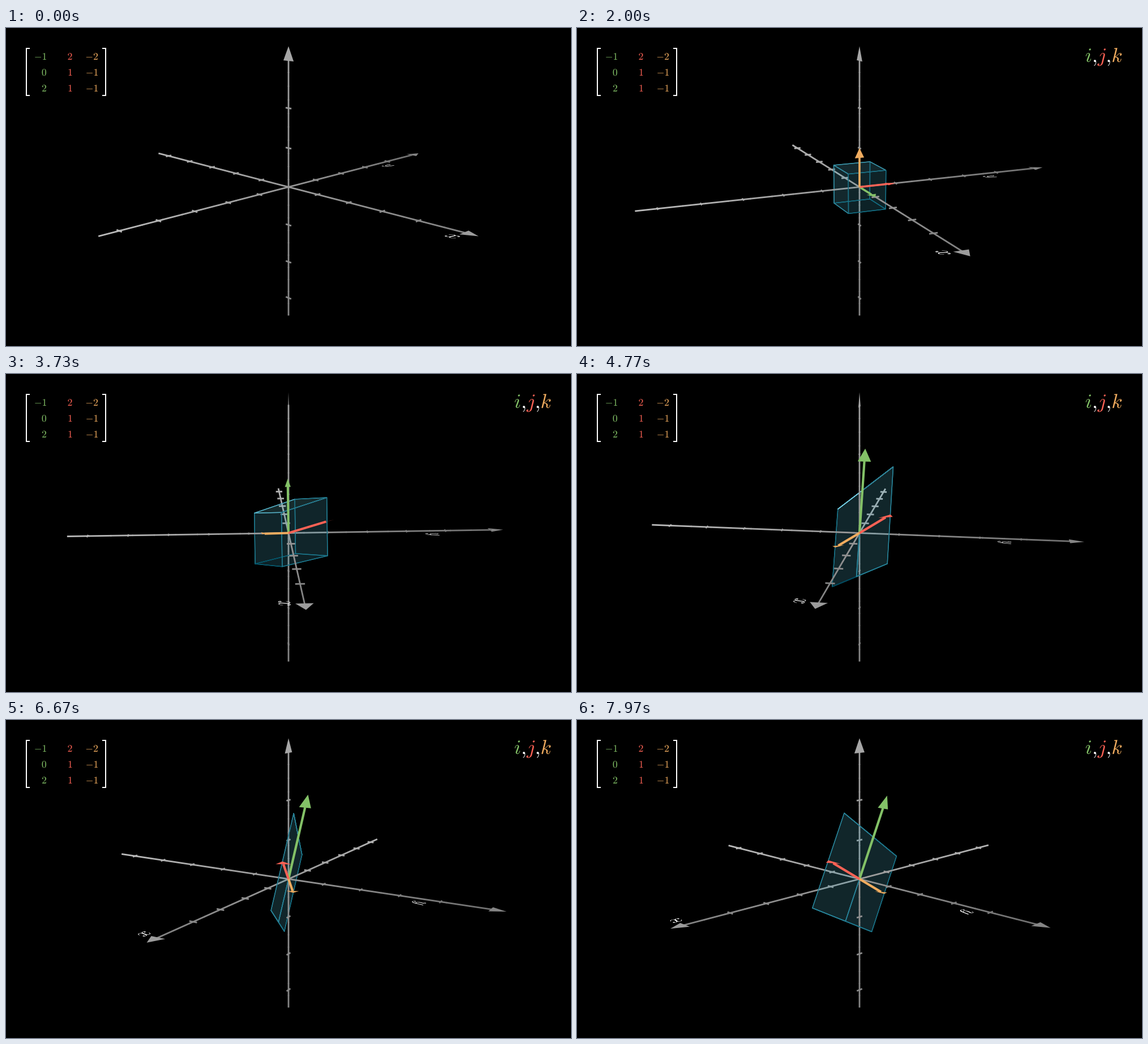
A matplotlib script that plays this animation: 998 by 561 pixels, repeating every 8 s.

```python
import math

import numpy as np
import matplotlib.pyplot as plt
from matplotlib.animation import FuncAnimation
from matplotlib.collections import PolyCollection
from matplotlib.patches import PathPatch, Rectangle
from matplotlib.path import Path
from matplotlib.textpath import TextPath

plt.rcParams["mathtext.fontset"] = "cm"

W, H, DPI = 998, 561, 64
PX = 72 / DPI                      # one pixel in points
UNIT = H / 8                       # pixels per scene unit
CENTER = np.array([499.0, 280.5])
FPS, FRAMES = 30, 240
FOCAL = 20
PHI = math.radians(75)
SIN_PHI, COS_PHI = math.sin(PHI), math.cos(PHI)
LIGHT = np.array([-7.0, -9.0, 10.0])
EM = 0.506                         # type size in scene units

GREEN, RED, GOLD = "#83C167", "#FC6255", "#F0AC5F"
FACE = np.array([88, 196, 221]) / 255
EDGE = np.array([28, 117, 138]) / 255
CLEAR = (0, 0, 0, 0)

MATRIX = np.array([[-1, 2, -2], [0, 1, -1], [2, 1, -1]], float)
BASIS = np.eye(3)

fig = plt.figure(figsize=(W / DPI, H / DPI), dpi=DPI, facecolor="black")
ax = fig.add_axes([0, 0, 1, 1])
ax.set_xlim(0, W)
ax.set_ylim(H, 0)
ax.axis("off")


# ---------- helpers ----------

def smooth(t):
    t = min(max(t, 0), 1)
    low = 1 / (1 + math.exp(5))
    s = 1 / (1 + math.exp(-10 * (t - 0.5)))
    return (s - low) / (1 - 2 * low)


def project(points, theta):
    """Screen positions and mean closeness to the viewer."""
    x, y, z = np.asarray(points, float).T
    c, s = math.cos(theta), math.sin(theta)
    near = x * c + y * s
    side = y * c - x * s
    up = z * SIN_PHI - near * COS_PHI
    out = near * SIN_PHI + z * COS_PHI
    scale = FOCAL / (FOCAL - out) * UNIT
    screen = np.column_stack([CENTER[0] + side * scale, CENTER[1] - up * scale])
    return screen, out.mean()


def partial(points, share):
    """The first part of a polyline."""
    if share >= 1:
        return points
    steps = np.linalg.norm(np.diff(points, axis=0), axis=1)
    dist = np.concatenate([[0], np.cumsum(steps)])
    stop = share * dist[-1]
    last = np.array([np.interp(stop, dist, col) for col in points.T])
    return np.vstack([points[dist < stop], last])


def shade(rgb, point, normal):
    sun = LIGHT - point
    f = 0.5 * (normal @ sun / np.linalg.norm(sun)) ** 3
    return np.clip(rgb + (f if f > 0 else f / 2), 0, 1)


def glyph(text, size):
    return TextPath((0, 0), text, size=size)


def placed(path, x, y):
    return Path(path.vertices * [1, -1] + [x, y], path.codes)


def collection(z):
    c = PolyCollection([], closed=False, zorder=z)
    c.set_snap(False)
    ax.add_collection(c, autolim=False)
    return c


def fill_collection(c, items):
    """Each item is (points, face, edge, width in pixels)."""
    c.set_verts([i[0] for i in items], closed=False)
    c.set_facecolor([i[1] for i in items] or "none")
    c.set_edgecolor([i[2] for i in items] or "none")
    c.set_linewidth([i[3] * PX for i in items] or 0)


# ---------- axes ----------

def build_axis(d, low, high, gray_low, gray_high, gray_tip):
    along = BASIS[d]
    across = BASIS[1 if d == 0 else 0]

    def gray(v):
        g = gray_low + (gray_high - gray_low) * (v - low) / (high - low)
        return (g, g, g, 1)

    items = []
    knots = np.linspace(low, high - 0.3, 21)
    for k, (a, b) in enumerate(zip(knots[:-1], knots[1:])):
        b += 0.015 if k < 19 else 0
        items.append((np.array([a * along, b * along]), CLEAR, gray(a), 2.8))
    for v in range(math.ceil(low), int(high)):
        if v:
            mid = v * along
            ends = np.array([mid - 0.1 * across, mid + 0.1 * across])
            items.append((ends, CLEAR, gray(v), 2.8))
    base = (high - 0.35) * along
    tip = np.array([high * along, base + 0.175 * across, base - 0.175 * across])
    items.append((tip, (gray_tip,) * 3 + (1,), CLEAR, 0))
    return items


axis_items = (build_axis(0, -5.5, 5.5, 0.70, 0.50, 0.61)
              + build_axis(1, -5.5, 5.5, 0.73, 0.42, 0.52)
              + build_axis(2, -3.5, 3.5, 0.52, 0.63, 0.65))


# ---------- cube ----------

def cube_items(m, grown):
    items = []
    sides = [(2, -1), (2, 1), (0, -1), (0, 1), (1, 1), (1, -1)]
    for k, (d, sign) in enumerate(sides):
        share = min(max(grown * 6 - k, 0), 1)
        if share == 0:
            continue
        u, v = BASIS[(d + 1) % 3], BASIS[(d + 2) % 3]
        loop = [(1, 1), (-1, 1), (-1, -1), (1, -1), (1, 1)]
        pts = np.array([sign * BASIS[d] + p * u + q * v for p, q in loop]) / 2 @ m.T
        normal = sign * np.cross(m @ u, m @ v)
        size = np.linalg.norm(normal)
        normal = normal / size if size > 1e-9 else np.zeros(3)
        mid = sign * m[:, d] / 2
        items.append((partial(pts, share),
                      (*shade(FACE, mid, normal), 0.1),
                      (*shade(EDGE, mid, normal), 1), 1.4))
    return items


# ---------- basis vectors ----------

def tip_of(v):
    length = np.linalg.norm(v)
    size = min(0.35, 0.25 * length)
    turn = math.atan2(v[1], v[0])
    wide = np.array([-math.sin(turn), math.cos(turn), 0]) * size / 2
    base = v * (1 - size / length)
    return np.array([v, base + wide, base - wide])


tips = [(tip_of(BASIS[k]), tip_of(MATRIX[:, k]), color)
        for k, color in enumerate((GREEN, RED, GOLD))]


def vector_items(a, grown, theta):
    if grown <= 0:
        return []
    items = []
    for start, end, color in tips:
        tip = ((1 - a) * start + a * end) * grown
        shaft = np.array([np.zeros(3), 0.98 * (tip[1] + tip[2]) / 2 + 0.02 * tip[0]])
        items.append((project(shaft, theta)[0], CLEAR, color, (3.5 + 0.7 * a) * grown))
        items.append((project(tip, theta)[0], color, CLEAR, 0))
    return items


# ---------- flat text ----------

def draw_matrix():
    for col, color in enumerate((GREEN, RED, GOLD)):
        for row in range(3):
            path = glyph(f"${int(MATRIX[row, col])}$", EM * UNIT / 2)
            right = 71 + 45.5 * col - path.get_extents().x1
            ax.add_patch(PathPatch(placed(path, right, 56 + 28 * row),
                                   fc=color, lw=0, zorder=5))
    for x, serif in ((35.2, 35.2), (174.6, 170)):
        for box in ((x, 35.4, 2.2, 84.4), (serif, 35.4, 6.8, 2), (serif, 117.8, 6.8, 2)):
            ax.add_patch(Rectangle(box[:2], box[2], box[3], fc="white", lw=0, zorder=5))


draw_matrix()

letters = []
pen, em = 897.6, EM * UNIT
for char, advance, color in (("i", 0.345, GREEN), (",", 0.278, "white"),
                             ("j", 0.412, RED), (",", 0.278, "white"),
                             ("k", 0.521, GOLD)):
    path = placed(glyph("${%s}$" % char, em), pen, 60)
    patch = PathPatch(path, fc=color, lw=0, zorder=5)
    ax.add_patch(patch)
    letters.append((patch, path.to_polygons(closed_only=False), color))
    pen += advance * em


def write_letters(t):
    """Trace each outline, then let the fill come in."""
    outlines = []
    for k, (patch, contours, color) in enumerate(letters):
        p = min(max(t * 1.8 - 0.2 * k, 0), 1)
        patch.set_alpha(max(0, 2 * p - 1))
        if 0 < p < 1:
            share = min(1, 2 * p)
            width = 1.4 * min(1, 2 - 2 * p)
            outlines += [(partial(c, share), CLEAR, color, width) for c in contours]
    return outlines


axis_labels = []
for char, spot in (("x", (5.12, -0.38)), ("y", (0.34, 3.59))):
    path = glyph(f"${char}$", 1)
    box = path.get_extents()
    flat = (path.vertices - [(box.x0 + box.x1) / 2, (box.y0 + box.y1) / 2]) * EM + spot
    points = np.column_stack([flat, np.zeros(len(flat))])
    patch = PathPatch(path, fc="white", lw=0, zorder=3)
    ax.add_patch(patch)
    axis_labels.append((patch, points, path.codes))


# ---------- animation ----------

solid = collection(1)
arrows = collection(4)
outline = collection(6)


def update(n):
    t = n / FPS
    theta = math.radians(-45 + 90 * n / FRAMES)
    grown = smooth(t)
    a = smooth((t - 2) / 3)
    m = (1 - a) * BASIS + a * MATRIX

    scene = []
    for points, face, edge, width in axis_items + cube_items(m, grown):
        screen, depth = project(points, theta)
        scene.append((depth, (screen, face, edge, width)))
    scene.sort(key=lambda s: s[0])
    fill_collection(solid, [s[1] for s in scene])
    fill_collection(arrows, vector_items(a, grown, theta))
    fill_collection(outline, write_letters(t))

    for patch, points, codes in axis_labels:
        patch.set_path(Path(project(points, theta)[0], codes))
    return [solid, arrows, outline]


anim = FuncAnimation(fig, update, frames=FRAMES, interval=1000 / FPS,
                     repeat=True, repeat_delay=0, blit=False)
plt.show()
```
